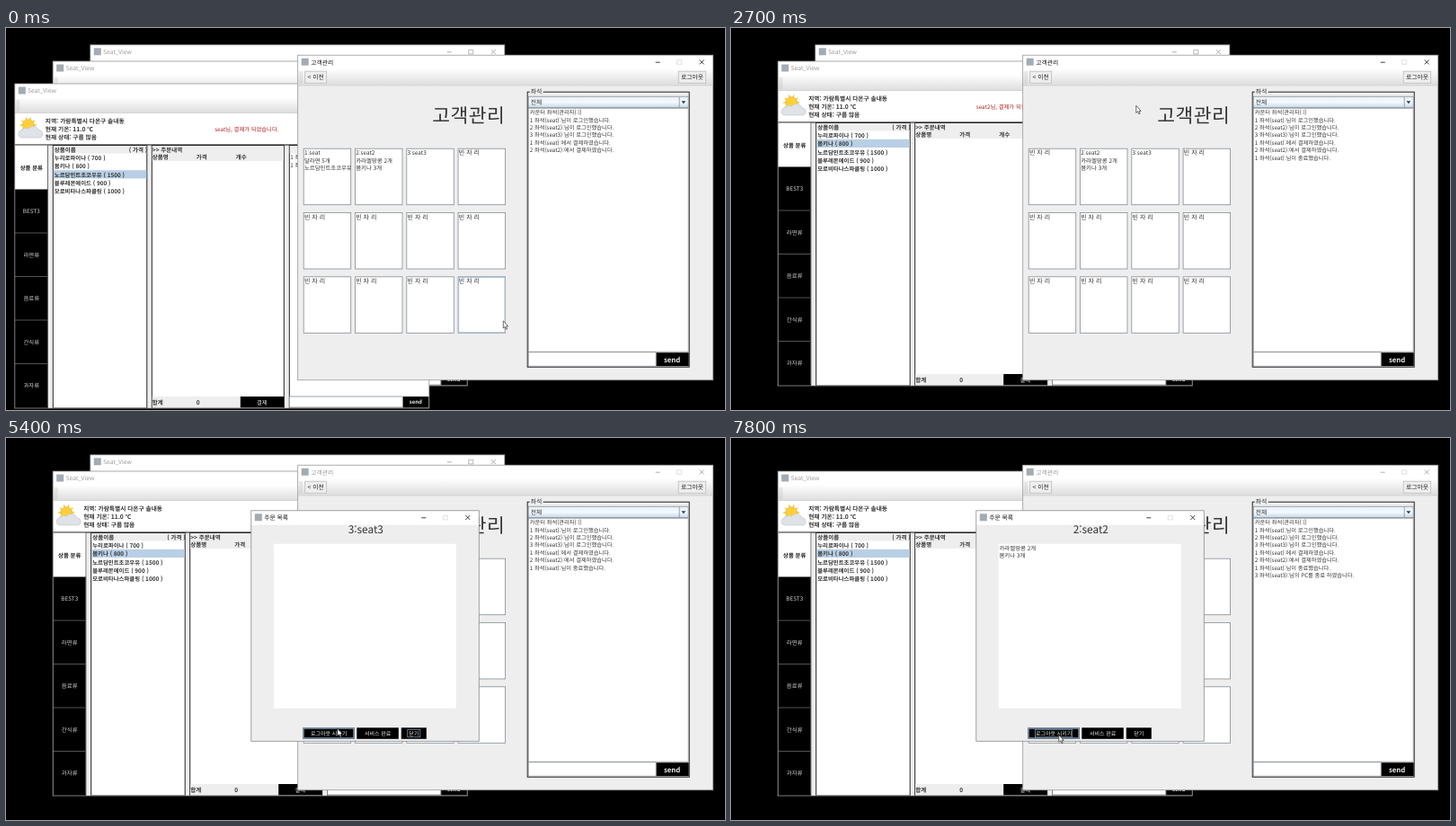
Animation, 800 px wide and 425 px high, one loop 8000 ms. Source, as an HTML page:

```html
<!DOCTYPE html>
<html lang="ko">
<head>
<meta charset="utf-8">
<title>고객관리</title>
<style>
html, body { margin: 0; width: 100%; height: 100%; overflow: hidden; background: #000; }
svg { display: block; width: 800px; height: 425px; }
text {
  font-family: "Noto Sans CJK KR", "Noto Sans CJK", "Noto Sans", sans-serif;
  text-rendering: geometricPrecision; white-space: pre; fill: #333;
}
.b { font-weight: 700; }
.m { text-anchor: middle; }
.head { font-weight: 300; letter-spacing: .5px; }
.cap { font-family: "Open Sans", "Noto Sans CJK KR", "Noto Sans CJK", sans-serif; }
</style>
</head>
<body>
<svg id="stage" viewBox="0 0 800 425" xmlns="http://www.w3.org/2000/svg"></svg>
<script>
const LOOP = 8000, GREY = '#eeeeee', SEL = '#b8cfe5', EDGE = '#858d95';
const stage = document.getElementById('stage');

const rect = (x, y, w, h, fill, stroke = 'none', sw = 1) =>
  `<rect x="${x}" y="${y}" width="${w}" height="${h}" fill="${fill}" stroke="${stroke}" stroke-width="${sw}"/>`;
const text = (x, y, s, size = 6.25, cls = '', fill = '#333') =>
  `<text x="${x}" y="${y}" font-size="${size}" class="${cls}" style="fill:${fill}">${s}</text>`;
const path = (d, stroke, fill = 'none', sw = 1) =>
  `<path d="${d}" stroke="${stroke}" fill="${fill}" stroke-width="${sw}"/>`;
const lines = (x, y, step, list, size, cls, fill) =>
  list.map((s, i) => text(x, y + i * step, s, size, cls, fill)).join('');
// Content shown only in the given "from-to" spans, in ms.
const on = (spans, body) => `<g data-on="${spans}">${body}</g>`;
const group = (id, x, y, body) => `<g id="${id}" transform="translate(${x} ${y})">${body}</g>`;
const frame = (w, h, color = '#9a9a9a') => rect(0, 0, w, h, 'none', color, .8);

function captionInk(w, title, fixed, ink) {
  const [a, b, c] = [w - 61.5, w - 37.5, w - 12.5];
  return text(14.5, 10.4, title, 6.8, 'cap', ink) +
    path(`M${a - 2.5} 8h5M${c - 2.5} 5.2l5 5m0-5l-5 5`, ink, 'none', .8) +
    path(`M${b - 2.5} 5.5h5v4.6h-5z`, fixed ? '#d4d4d4' : ink, 'none', .7);
}

function caption(w, title, fixed, active) {
  return rect(0, 0, w, 16, '#fff') + rect(4, 3.5, 8, 8, '#a3abb3') +
    captionInk(w, title, fixed, '#999') +
    (active ? on(active, rect(14, 2, w - 16, 12, '#fff') + captionInk(w, title, fixed, '#111')) : '');
}

const toolbar = (y, w, h) => rect(0, y, w, h, 'url(#bar)') +
  path(`M2.5 ${y + 2}v${h - 4}M4.5 ${y + 2}v${h - 4}`, '#bcc3ca', 'none', .6) +
  path(`M0 ${y + h - .3}h${w}`, '#ccc', 'none', .6);

const button = (x, y, w, label, hover) =>
  rect(x, y, w, 13, hover ? 'url(#metal)' : GREY, hover ? '#7a8a99' : '#bdbdbd', .8) +
  text(x + w / 2, y + 9, label, 6.8, 'm', '#222');

const weather = () => {
  let rays = '';
  for (let i = 0; i < 10; i++) {
    const a = i * Math.PI / 5, c = Math.cos(a), s = Math.sin(a);
    rays += `M${15 + 6 * c} ${46 + 6 * s}L${15 + 9 * c} ${46 + 9 * s}`;
  }
  return path(rays, '#f7c531', 'none', 1.3) +
    '<circle cx="15" cy="46" r="6.3" fill="#fbd03c" stroke="#efa928" stroke-width=".7"/>' +
    path('M7 60a4.3 4.3 0 0 1 1-8.4a5 5 0 0 1 7-1.3a7 7 0 0 1 12 1.5a4.3 4.3 0 0 1 1.5 8.2z', '#c4c9d0', '#dfe3e8', .7);
};

const goods = ['누리로파이나 ( 700 )', '봄키나 ( 800 )', '노르담민트초코우유 ( 1500 )',
  '블루레몬에이드 ( 900 )', '모로비타나스파클링 ( 1000 )'];
const menu = ['BEST3', '라면류', '음료류', '간식류', '과자류'];

function shop(seat, name, picked, active) {
  const W = 461, H = 361, top = 68.5;
  let s = rect(0, 0, W, H, GREY) + caption(W, 'Seat_View', false, active) + toolbar(16, W, 17) +
    button(428.5, 18, 31, '로그아웃');
  if (active) s += on('1500-2700', button(428.5, 18, 31, '로그아웃', true));
  s += rect(0, 33, W, 34.5, '#fff') + weather() +
    lines(34, 44.3, 8.7, ['지역: 가람특별시 다온구 솔내동', '현재 기온: 11.0 ℃', '현재 상태: 구름 많음'], 6.7, 'b') +
    text(258, 52.5, name + '님, 결제가 되었습니다.', 6.3, 'm', '#b01c1c') +
    lines(386, 44.3, 8.7, ['아이디 : ' + name, '로그인 시간: 02:45:18 오후', '포인트 : 67000'], 6.6, 'b') +
    path(`M0 ${top - .5}H${W}`, '#111');

  s += rect(0, top, 37, H - top, '#000') + rect(0, top, 36.5, 49, '#fff') +
    text(18.5, 95.5, '상품 분류', 6.4, 'm b', '#222');
  menu.forEach((m, i) => {
    const y = 117.5 + i * 48.5;
    s += path(`M0 ${y}H36.5V${y + 48}`, '#777', 'none', .7) + text(18.5, y + 26.6, m, 6.4, 'm', '#ccc');
  });

  s += rect(42.5, top, 104.5, H - top, '#fff', '#222') + rect(43, 69, 103.5, 8.5, GREY) +
    rect(43, 77.4 + picked * 9.4, 103.5, 9.2, SEL) +
    text(44, 76, '상품이름', 6.5, 'b') + text(127, 76, '( 가격 )', 6.5, 'b') +
    lines(44, 84.8, 9.4, goods, 6.4, 'b');

  s += rect(152.5, top, 147, H - top, '#fff', '#222') + rect(153, 69, 146, 17, GREY) +
    text(153, 76, '&gt;&gt; 주문내역', 6.5, 'b') +
    ['상품명', '가격', '개수'].map((h, i) => text([153, 202, 246][i], 84.3, h, 6.5, 'b')).join('') +
    rect(153, 348, 146, 12.5, GREY) + text(153, 356.5, '합계', 6.5, 'b') + text(202, 356.5, '0', 6.5, 'b') +
    rect(251, 348, 48.5, 12.5, '#000') + text(275, 356.5, '결제', 6.3, 'm', '#eee');
  if (active) s += on('900-2700', rect(268.5, 350, 13, 8.5, 'none', '#8a9aaa', .6));

  s += rect(305.5, top, 157, H - top, '#fff', '#222') + rect(306, 69, 155, 8.5, GREY) +
    text(383, 76, 'Chatting', 6.8, 'm b') +
    lines(306.5, 84.3, 8.4, [`${seat} 좌석(${name}):님이 로그인했습니다.`, `${seat} 좌석(${name}):에서 결제하였습니다.`]) +
    rect(305.5, 348, 126, 12, '#fff', EDGE, .8) + rect(432, 348, 29, 12.5, '#000') +
    text(446, 356, 'send', 6, 'm b', '#eee');
  return `<g clip-path="url(#shopClip)">${s}</g>` + frame(W, H);
}

const cellX = c => 6.5 + c * 57.3, cellY = r => 104 + r * 71.3;
const cellText = (c, list) => lines(cellX(c) + .7, 111.3, 8.4, list, 6.4);
const glow = (c, r) => rect(cellX(c) + .5, cellY(r) + .5, 51.5, 61.5, 'none', '#a9bfd6', 1.1);

function manager() {
  const W = 462, H = 361.5;
  let s = rect(0, 0, W, H, GREY) + caption(W, '고객관리', true, '0-600 2700-4800 5700-7200') +
    toolbar(16, W, 18) + button(8, 18, 24, '&lt; 이전') + button(423.5, 18, 30.5, '로그아웃') +
    text(149.5, 75, '고객관리', 21.5, 'head', '#333');
  const vacant = (c, r = 0) => text(cellX(c) + .7, cellY(r) + 7.3, '빈 자 리', 7);
  for (let i = 0; i < 12; i++) {
    const c = i % 4, r = i >> 2;
    s += rect(cellX(c), cellY(r), 52.5, 62.5, '#fff', EDGE, .8);
    if (r || c == 3) s += vacant(c, r);
  }
  s += '<g clip-path="url(#cellClip)">' +
    on('0-2700', cellText(0, ['1:seat', '달라면 5개', '노르담민트초코우유 1개'])) + '</g>' +
    on('2700-8000', vacant(0)) + cellText(1, ['2:seat2', '카라멜땅콩 2개', '봄키나 3개']) +
    on('0-4500', cellText(2, ['3:seat3'])) +
    on('4500-5700', rect(cellX(2) + .4, 104.4, 51.7, 61.7, SEL)) + on('5700-8000', vacant(2)) +
    on('0-300', glow(3, 2)) + on('6300-6600', glow(2, 1)) + on('6600-8000', glow(1, 0));

  s += rect(255.5, 41, 180, 306, 'none', '#222') + rect(258, 38, 15, 6, GREY) + text(259, 43, '좌석', 6.8) +
    rect(256.5, 46, 178, 12.5, 'url(#metal)', EDGE, .8) + text(259, 54.6, '전체', 6.8) +
    path('M424.5 46.5v11.5', EDGE, 'none', .8) + path('M426.7 51h5l-2.5 3z', 'none', '#23405f') +
    rect(256.5, 59, 178, 271, '#fff', EDGE, .8);
  const log = ['카운터 좌석(관리자):()', '1 좌석(seat):님이 로그인했습니다.', '2 좌석(seat2):님이 로그인했습니다.',
    '3 좌석(seat3):님이 로그인했습니다.', '1 좌석(seat):에서 결제하였습니다.', '2 좌석(seat2):에서 결제하였습니다.'];
  s += lines(258, 66, 8.4, log) +
    on('2700-8000', text(258, 116.4, '1 좌석(seat):님이 종료했습니다.')) +
    on('5700-8000', text(258, 124.8, '3 좌석(seat3):님의 PC를 종료 하였습니다.')) +
    rect(256.5, 330.5, 142, 15.5, '#fff', EDGE, .8) + rect(399, 331, 36, 15, '#000') +
    text(416.5, 341.5, 'send', 7.8, 'm b', '#eee');
  return s + frame(W, H);
}

function orders() {
  const W = 253.5, H = 256.5;
  const black = (x, w, label) => rect(x, 241.5, w, 12.5, '#000') +
    text(x + w / 2, 250, label, 6, 'm', '#eee');
  const focus = (x, w) => rect(x, 243.5, w, 8.5, 'none', '#8fa5bd', .7);
  const body = rect(0, 0, W, H, GREY) + caption(W, '주문 목록', true, '0-8000') +
    on('4800-5700', text(127.5, 25.5, '3:seat3', 11.8, 'm')) +
    rect(25, 37, 203, 183, '#fff') +
    on('7200-8000', text(127.5, 25.5, '2:seat2', 11.8, 'm') + lines(25.7, 44, 8.4, ['카라멜땅콩 2개', '봄키나 3개'], 6.4)) +
    black(57.5, 57.5, '로그아웃 시키기') + black(117.5, 46.5, '서비스 완료') + black(167, 28, '닫기') +
    on('5400-5700 7500-8000', rect(58.2, 242.2, 56, 11, 'none', '#9db8d4', 1.2)) +
    on('4800-5700', focus(174, 14)) + on('7200-8000', focus(65.5, 41.5)) + frame(W, H, '#8c8c8c');
  const ghost = rect(0, 0, W, 16, '#f7f7f7') + rect(4, 3.5, 8, 8, '#c4c9ce') +
    captionInk(W, '주문 목록', true, '#999') + frame(W, H, '#bdbdbd');
  return on('4500-4800', ghost) + on('4800-5700 7200-8000', body);
}

const grad = (id, a, b, c) => `<linearGradient id="${id}" x2="0" y2="1"><stop stop-color="${a}"/>` +
  `<stop offset=".5" stop-color="${b}"/><stop offset="1" stop-color="${c}"/></linearGradient>`;

stage.innerHTML = '<defs>' + grad('metal', '#e6eef6', '#f6fafd', '#c4d7e9') + grad('bar', '#fdfdfd', '#ededed', '#dcdcdc') +
  `<clipPath id="shopClip">${rect(0, 0, 461, 361, '#000')}</clipPath>` +
  `<clipPath id="cellClip">${rect(6.5, 104, 52.5, 62, '#000')}</clipPath></defs>` +
  on('0-6000', group('shop3', 93.8, 18.8, shop(3, 'seat3', 0))) +
  group('shop2', 52.2, 37, shop(2, 'seat2', 1)) +
  on('0-2700', group('shop1', 9.8, 62, shop(1, 'seat', 2, '900-2700'))) +
  group('manager', 324.7, 30.2, manager()) +
  group('orders', 272.8, 80.8, orders()) +
  `<g id="cursor">${path('M.3 .3V8.4L2.1 6.8L3.4 9.7L4.6 9.2L3.4 6.3H5.7z', '#222', '#fff', .65)}</g>`;

// Pointer stops: time, x, y.
const stops = [[0, 553, 325.5], [300, 481, 413], [600, 466, 395], [900, 434, 72], [1200, 438, 74], [1500, 446, 82],
  [1800, 450.5, 86], [3000, 657, 220.5], [3300, 656.5, 221.5], [3600, 622, 207], [3900, 601, 203], [4200, 597, 202],
  [4500, 477, 177], [4800, 476, 283], [5100, 402, 299], [5400, 368.5, 323], [6000, 424, 278],
  [6300, 456, 230], [6600, 434.5, 176], [7200, 434, 183], [7500, 367, 328], [7800, 364.5, 330]];

const get = id => document.getElementById(id);
const cursor = get('cursor'), desk = get('manager'), dialog = get('orders');
const raised = get('shop1').parentNode;
const parts = [...stage.querySelectorAll('[data-on]')].map(el => ({
  el, spans: el.dataset.on.split(' ').map(s => s.split('-').map(Number))
}));

function show(t) {
  for (const { el, spans } of parts)
    el.style.display = spans.some(([a, b]) => t >= a && t < b) ? '' : 'none';
  const next = t >= 600 ? dialog : desk;
  if (raised.nextSibling !== next) stage.insertBefore(raised, next);
  const [, x, y] = stops.findLast(s => s[0] <= t);
  cursor.setAttribute('transform', `translate(${x} ${y})`);
}

const start = performance.now();
function tick() {
  show((performance.now() - start) % LOOP);
  requestAnimationFrame(tick);
}
tick();
</script>
</body>
</html>
```
